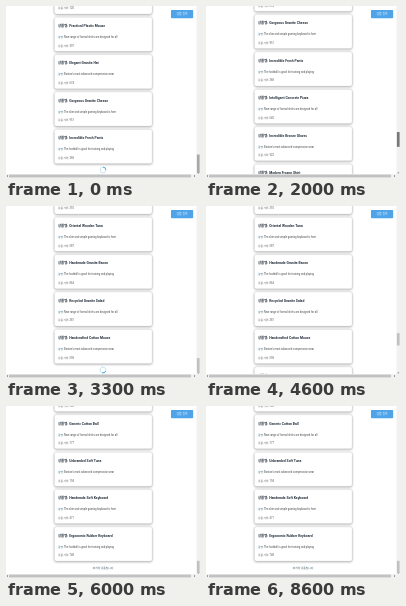
Recreate the animation shown at these times as an HTML page. Size 194 by 172 pixels, loop 8700 ms.

```html
<!DOCTYPE html>
<html>
<head>
<meta charset="utf-8">
<title>Infinite scroll</title>
<style>
  html, body { margin: 0; width: 100%; height: 100%; overflow: hidden; background: #fff; }
  svg { display: block; width: 100vw; height: 100vh; }
  text { font-family: Roboto, "Noto Sans CJK KR", "Noto Sans CJK", sans-serif; }
  .card { fill: #fff; stroke: #dcdcdc; stroke-width: 3; filter: drop-shadow(0 6px 8px #0006); }
  .title { font-size: 34px; font-weight: 700; fill: #1f2b38; }
  .about { font-size: 26px; fill: #444; }
  .about tspan { fill: #28607c; }
  .price { font-size: 26px; fill: #555; }
  .end { font-size: 27px; fill: #3c5664; text-anchor: middle; }
  .button text { font-size: 29px; fill: #fff; text-anchor: middle; }
</style>
</head>
<body>
<svg viewBox="0 0 1940 1720" preserveAspectRatio="none">
  <g id="list"></g>
  <g id="spinner" fill="none" stroke-width="9">
    <circle r="29" stroke="#c3e2f1"/>
    <path d="M0-29A29 29 0 0 1 29 0" stroke="#4ba9d6"/>
  </g>
  <text id="end" class="end" x="970" y="1629">마지막 상품입니다</text>
  <g id="button" class="button">
    <rect x="1650" y="40" width="222" height="82" rx="8" fill="#4fa3e8"/>
    <text x="1761" y="91">상품 등록</text>
  </g>
  <path d="M0 1680H1940V1720H0ZM1905 0H1940V1720H1905Z" fill="#f1f1f1"/>
  <rect x="30" y="1686" width="1820" height="28" fill="#c1c1c1"/>
  <path d="M20 1688V1712L8 1700ZM1880 1688V1712L1892 1700ZM1912 1664H1934L1923 1677Z" fill="#777"/>
  <rect id="thumb" x="1909" width="27"/>
</svg>
<script>
const $ = id => document.getElementById(id);
const LOOP = 8700, PITCH = 374, VIEW = 1680;

const names = [
  "Small Metal Chair", "Practical Plastic Mouse", "Elegant Granite Hat", "Gorgeous Granite Cheese",
  "Incredible Fresh Pants", "Intelligent Concrete Pizza", "Incredible Bronze Gloves",
  "Modern Frozen Shirt", "Rustic Steel Chips", "Luxurious Rubber Soap", "Tasty Wooden Bike",
  "Oriental Wooden Tuna", "Handmade Granite Bacon", "Recycled Granite Salad",
  "Handcrafted Cotton Mouse", "Refined Metal Towels", "Licensed Soft Shoes", "Bespoke Steel Car",
  "Handcrafted Concrete Table", "Incredible Plastic Sausages", "Sleek Fresh Salad",
  "Generic Cotton Ball", "Unbranded Soft Tuna", "Handmade Soft Keyboard", "Ergonomic Rubber Keyboard"
];
const abouts = [
  "The football is good for training and playing",
  "New range of formal shirts are designed for all",
  "Boston's most advanced compression wear",
  "The slim and simple gaming keyboard is here"
];

// Title baselines sit 374 units apart; the fifth card ends the first loaded page.
$("list").innerHTML = names.map((name, i) => `
  <g transform="translate(0 ${1320 + (i - 4) * PITCH})">
    <rect class="card" x="485" y="-85" width="975" height="340" rx="18"/>
    <text class="title" x="520" y="12">상품명: ${name}</text>
    <text class="about" x="520" y="123"><tspan>설명:</tspan> ${abouts[i % 4]}</text>
    <text class="price" x="520" y="209">상품 가격: ${120 + i * 277 % 860}</text>
  </g>`).join("");
const cards = [...$("list").children];

const scrollStops = [
  [0, 0], [1700, 0], [1800, 100], [1900, 390], [2000, 775], [2200, 2350], [2400, 3645], [2500, 3740],
  [4600, 3740], [4700, 3930], [4900, 4800], [5200, 6430], [5300, 7050], [5400, 7505], [LOOP, 7505]
];

function scrollAt(t) {
  const i = scrollStops.findIndex(([time]) => time > t);
  const [t0, y0] = scrollStops[i - 1], [t1, y1] = scrollStops[i];
  return y0 + (y1 - y0) * (t - t0) / (t1 - t0);
}

function draw(now) {
  const t = Math.floor(now % LOOP / 100) * 100;
  const page = t < 1500 ? 0 : t < 4400 ? 1 : 2;
  const scroll = scrollAt(t);
  const total = 15200 + page * 10 * PITCH;

  $("list").setAttribute("transform", `translate(0 ${-scroll})`);
  cards.forEach((card, i) => card.style.display = i < 5 + page * 10 ? "" : "none");

  const spinnerY = 1640 + page * 10 * PITCH - scroll;
  $("spinner").style.display = page < 2 ? "" : "none";
  $("spinner").setAttribute("transform", `translate(970 ${spinnerY}) rotate(${t * .36})`);
  $("end").style.display = page === 2 ? "" : "none";
  $("end").setAttribute("transform", `translate(0 ${7505 - scroll})`);

  const dragging = t >= 1700 && t < 2600 || t >= 4700 && t < 5600;
  $("thumb").setAttribute("y", (13520 + scroll) / total * 1670);
  $("thumb").setAttribute("height", VIEW / total * 1670);
  $("thumb").setAttribute("fill", dragging ? "#787878" : t < 1700 ? "#a8a8a8" : "#c1c1c1");
  $("button").style.opacity = t >= 7100 && t < 7400 ? .68 : 1;
}

const start = performance.now();
function tick() {
  draw(performance.now() - start);
  requestAnimationFrame(tick);
}
tick();
</script>
</body>
</html>
```
